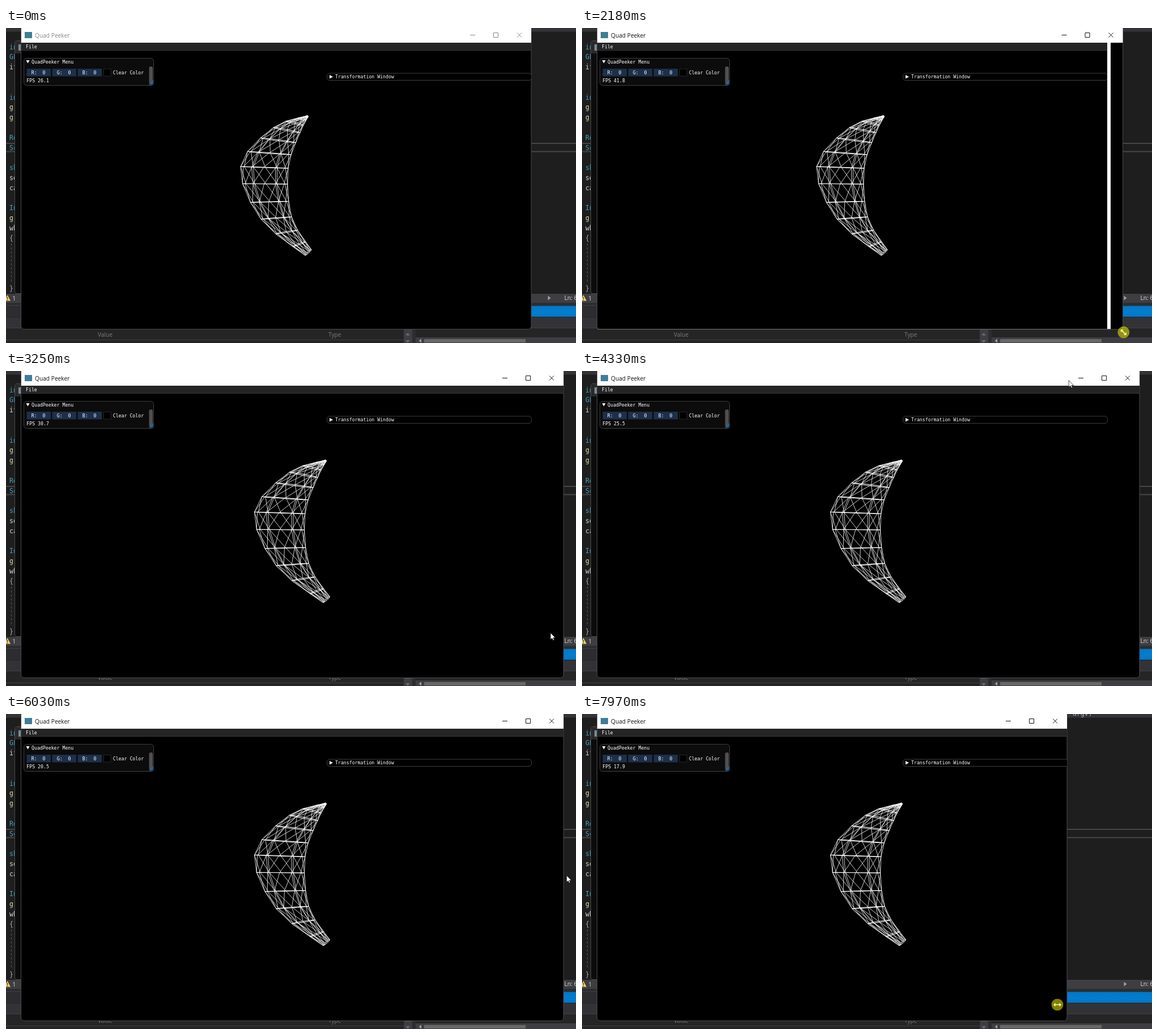
Animation, 1006 px wide and 557 px high, one loop 8000 ms. Source, as an HTML page:

```html
<!DOCTYPE html>
<html lang="en">
<head>
<meta charset="utf-8">
<title>Wireframe window resize</title>
<style>
html, body { margin: 0; width: 100%; height: 100%; overflow: hidden; background: #1e1e1e; }
svg { display: block; width: 100%; height: 100%; }
text { white-space: pre; }
.ui { font: 10.2px "Open Sans", "Noto Sans", sans-serif; }
.code { font: 11.5px "DejaVu Sans Mono", monospace; }
.gui { font: 8.22px "DejaVu Sans Mono", monospace; fill: #fff; }
.wire { fill: none; stroke: #fff; vector-effect: non-scaling-stroke; }
</style>
</head>
<body>
<svg viewBox="0 0 1006 557" xmlns="http://www.w3.org/2000/svg">
  <defs>
    <clipPath id="view"><rect id="viewRect" x="27" y="26" width="900" height="506"/></clipPath>
    <pattern id="grip" width="4" height="4" patternUnits="userSpaceOnUse">
      <path d="M0 .5h1M2 2.5h1" stroke="#2f93d8"/>
    </pattern>
  </defs>

  <!-- code editor behind -->
  <rect width="1006" height="557" fill="#1e1e1e"/>
  <rect width="1006" height="6.5" fill="#333338"/>
  <text class="code" x="866" y="2.5" fill="#b4b4b4">argv)</text>
  <path d="M0 204H1006M0 218.5H1006" stroke="#464646" stroke-width="2"/>
  <g id="code" class="code"></g>
  <path d="M9.5 381V450" stroke="#5a5a5a" stroke-dasharray="4 3"/>
  <path d="M27.5 22.5H20Q15.5 22.5 15.5 27V465Q15.5 469.5 20 469.5H27.5Z" fill="#0c0c0c" stroke="#4a4a4a"/>
  <path d="M27 23H20Q16 23 16 27V45H27Z" fill="#2a2a2b"/>
  <rect x="22" y="29" width="10" height="11" fill="#7d8896"/>

  <!-- status strip and lower panels -->
  <rect y="470" width="1006" height="16" fill="#3e3e42"/>
  <path d="M2.5 472L8 482.5H-3Z" fill="#f0cf6a"/>
  <path d="M2.5 475.5V479M2.5 480V481.5" stroke="#222" stroke-width="1.2"/>
  <text class="ui" x="11.5" y="481.5" fill="#d4d4d4">1</text>
  <path d="M956.5 473.5L961.5 477.5L956.5 481.5Z" fill="#a0a0a0"/>
  <text class="ui" x="985.5" y="481.3" fill="#e0e0e0">Ln: 63</text>
  <rect y="486" width="1006" height="71" fill="#2d2d30"/>
  <path d="M0 490.5H717" stroke="#3f3f46"/>
  <rect x="723" y="491.5" width="283" height="19" fill="#007acc"/>
  <rect x="723" y="497" width="283" height="8" fill="url(#grip)" opacity=".6"/>
  <rect y="511" width="1006" height="46" fill="#252526"/>
  <rect y="512" width="1006" height="18" fill="#333337"/>
  <path d="M0 530.5H1006M0 551.5H702" stroke="#3f3f46"/>
  <g class="ui" fill="#7c7c7c">
    <text x="162" y="546">Value</text>
    <text x="569" y="546">Type</text>
  </g>
  <rect x="702" y="531" width="15" height="26" fill="#3e3e42"/>
  <path d="M705 543.5L709 539L713 543.5ZM705 552L709 556.5L713 552Z" fill="#6c6c6c"/>
  <rect x="717" y="511" width="6" height="46" fill="#2d2d30"/>
  <rect x="723" y="547" width="283" height="10" fill="#3e3e42"/>
  <path d="M733 549.5L728.5 553L733 556.5Z" fill="#a0a0a0"/>
  <rect x="738" y="550" width="179" height="6" fill="#686868"/>

  <!-- application window -->
  <rect id="frame" x="26.5" y="-12" rx="5.5" fill="#000" stroke="#4b4b4b"/>
  <path id="stale" fill="#fff"/>
  <rect id="titleBar" x="27" width="900" height="26" fill="#fff"/>
  <rect x="33" y="7" width="13" height="11" fill="#3d7f96"/>
  <text id="title" class="ui" x="51" y="16.8">Quad Peeker</text>
  <g id="caption" fill="none">
    <rect id="hover" x="-41" width="41" height="25.5" fill="#c42b1c"/>
    <path id="sizeIcons" d="M-108 12.5H-99M-66.5 8.5H-58.5V16.5H-66.5Z"/>
    <path id="closeIcon" d="M-25 8.5L-17 16.5M-17 8.5L-25 16.5"/>
  </g>

  <g clip-path="url(#view)">
    <rect x="27" y="26" width="980" height="13" fill="#242424"/>
    <path d="M27 39.5H1006" stroke="#37373f"/>
    <g id="mesh">
      <path id="rings" class="wire" stroke-width="1"/>
      <path id="edges" class="wire" stroke-width=".8"/>
    </g>
    <rect x="31.5" y="53.5" width="229" height="48" rx="5" fill="#0c0c0c" stroke="#3e3e46"/>
    <path d="M35.5 57H41.5L38.5 62.5Z" fill="#fff"/>
    <g id="fields" fill="#1d2f4b"></g>
    <rect x="172.5" y="72.5" width="12.5" height="12.5" fill="#000" stroke="#25252b"/>
    <path d="M251 101.5H257Q260.5 101.5 260.5 98V91Z" fill="#1c4066"/>
    <rect x="252.5" y="68" width="6.5" height="31" rx="3" fill="#4f4f4f"/>
    <path d="M253 99L259 93V96Q259 99 256 99Z" fill="#31688f"/>
    <rect x="566.5" y="80" width="361" height="12.5" rx="4.5" fill="#000" stroke="#3e3e46"/>
    <path d="M571 83L577 86.2L571 89.5Z" fill="#fff"/>
    <g class="gui">
      <text x="35" y="36">File</text>
      <text x="45" y="62.6">QuadPeeker Menu</text>
      <text x="188.7" y="81.7">Clear Color</text>
      <text id="fps" x="36.3" y="95.8"></text>
      <text x="581" y="89.4">Transformation Window</text>
    </g>
  </g>

  <g id="cursor">
    <circle id="press" r="10.5" fill="#ff0" fill-opacity=".5"/>
    <path id="arrow" d="M0 0V12L2.8 9.4L4.7 13.4L6.6 12.5L4.8 8.7H8.6Z" fill="#fff" stroke="#000" stroke-width=".7"/>
    <path id="resizer" d="M-7 0L-3.5 -3.5V-.8H3.5V-3.5L7 0L3.5 3.5V.8H-3.5V3.5Z" stroke="#000" stroke-width=".6"/>
  </g>
</svg>
<script>
const LOOP = 8000, FPS_STEP = 65;
const LEFT = 27, TOP = 26;
// The first drag grows the window, the second one narrows it.
const GROW = 1760, RELAYOUT = 2760, SHRINK = 7720, SHRUNK = 7970;

const $ = id => document.getElementById(id);
const set = (id, attrs) => {
  for (const k in attrs) $(id).setAttribute(k, attrs[k]);
};
const show = (id, on) => set(id, { display: on ? 'inline' : 'none' });
const ramp = (t, from, to) => Math.min(1, Math.max(0, (t - from) / (to - from)));
const mix = (a, b, u) => a + (b - a) * u;

// Pointer stops: time, x, y.
const STOPS = [[270, 942, 520], [1340, 923, 532], [GROW, 928, 533], [2500, 977, 542], [RELAYOUT, 981, 545],
  [3250, 961, 463], [3570, 936, 100], [4400, 852, 9], [5070, 980, 5], [6100, 990, 306],
  [7210, 983, 546], [SHRINK, 984, 515], [SHRUNK, 839, 514]];

function pointer(t) {
  const n = Math.max(1, STOPS.findIndex(s => s[0] > t));
  const last = t >= SHRUNK ? STOPS.length - 1 : n;
  const a = STOPS[last - 1], b = STOPS[last], u = ramp(t, a[0], b[0]);
  return [mix(a[1], b[1], u), mix(a[2], b[2], u)];
}

function windowSize(t) {
  const grow = ramp(t, GROW, 2630);
  return [927 + 57 * grow - 128 * ramp(t, SHRINK, SHRUNK), 532 + 10 * grow ** 5];
}

// Rises, stalls during each drag, then decays.
function frameRate(t) {
  if (t < RELAYOUT) {
    return 26.1 + 20.8 * Math.sin(ramp(t, 0, 1300) * Math.PI / 2) - 5.1 * ramp(t, 1340, GROW);
  }
  return 15.4 + 15.3 * Math.exp((3250 - Math.min(t, 7760)) / 2506);
}

function buildCode() {
  const rows = 'in|GL|if|||in|g|g||Re|Sc||sh|se|ca||In|g|wh|{|||||}'.split('|');
  const color = s => s === 'g' ? '#dcdcaa' : /[{}]/.test(s) ? '#a8a8a8'
    : /if|se|ca|wh/.test(s) ? '#cfd8dc' : '#439fc0';
  $('code').innerHTML = rows.map((s, i) =>
    `<text x="6" y="${37.5 + i * 17.8}" fill="${color(s)}">${s}</text>`).join('');
}

function buildFields() {
  $('fields').innerHTML = ['R', 'G', 'B'].map((name, i) => {
    const x = 36.5 + i * 45;
    return `<rect x="${x}" y="72" width="42.5" height="13.5"/>
      <text class="gui" x="${x + 8.3}" y="81.7">${name}:  0</text>`;
  }).join('');
}

function spline(p, u) {
  const i = Math.min(Math.floor(u), p.length - 2), f = u - i;
  const at = k => p[Math.min(p.length - 1, Math.max(0, k))];
  return p[i].map((b, k) => {
    const a = at(i - 1)[k], c = at(i + 1)[k], d = at(i + 2)[k];
    return b + f / 2 * (c - a + f * (2 * a - 5 * b + 4 * c - d + f * (3 * (b - c) + d - a)));
  });
}

function buildMesh() {
  // Outer and inner end of a few cross-sections, tip to stem.
  const keys = [[531, 155.5, 533.5, 156.5], [472, 176, 519, 185], [414, 245, 498, 248],
    [450, 338, 504, 334], [528, 402, 539, 392]];
  const perKey = 3, sides = 12, count = (keys.length - 1) * perKey;
  const point = (i, j) => {
    const [ox, oy, ix, iy] = spline(keys, i / perKey);
    const a = j * 2 * Math.PI / sides, u = (1 - Math.cos(a)) / 2, depth = Math.sin(a);
    const x = mix(ox, ix, u) + depth * (ix - ox) * .02;
    const y = mix(oy, iy, u) + depth * (oy - 279) * .01;
    return x.toFixed(1) + ' ' + y.toFixed(1);
  };
  let rings = '', edges = '';
  for (let i = 0; i <= count; i++) {
    for (let j = 0; j < sides; j++) {
      const p = point(i, j);
      rings += `M${p}L${point(i, j + 1)}`;
      if (i === count) continue;
      edges += `M${p}L${point(i + 1, j + 1)}`;
      if (j % 2 === 0) edges += `M${p}L${point(i + 1, j)}`;
    }
  }
  set('rings', { d: rings });
  set('edges', { d: edges });
}

function drawWindow(t) {
  const [right, bottom] = windowSize(t);
  const active = t >= GROW, laidOut = t >= RELAYOUT;
  const viewRight = laidOut ? right : 927, viewBottom = laidOut ? 542 : 532;
  set('frame', { width: right - LEFT + .5, height: bottom + 12.5 });
  set('titleBar', { width: right - LEFT });
  set('viewRect', { width: viewRight - LEFT, height: viewBottom - TOP });

  // Unpainted strip left beside the old view while the window grows.
  show('stale', !laidOut && right > 927);
  set('stale', { d: `M927 26H${Math.min(933, right)}V${bottom}H27V532H927Z` });

  const sx = laidOut ? 957 / 900 : 1, sy = laidOut ? 516 / 506 : 1;
  set('mesh', { transform: `matrix(${sx} 0 0 ${sy} ${LEFT * (1 - sx)} ${TOP * (1 - sy)})` });

  const [px, py] = pointer(t);
  const hot = py < TOP && px > right - 41 && px < right;
  const ink = active ? '#111' : '#868686';
  set('title', { fill: ink });
  set('caption', { transform: `translate(${right} 0)` });
  set('sizeIcons', { stroke: ink });
  set('closeIcon', { stroke: hot ? '#fff' : ink });
  show('hover', hot);
}

function drawPointer(t) {
  const [x, y] = pointer(t);
  const sideways = t >= 7450;
  const diagonal = (t >= 1450 && t < 2850) || (t >= 6900 && !sideways);
  const pressed = (t >= GROW && t < RELAYOUT) || t >= SHRINK;
  show('cursor', t >= STOPS[0][0]);
  set('cursor', { transform: `translate(${x} ${y})` });
  show('press', pressed);
  show('arrow', !diagonal && !sideways);
  show('resizer', diagonal || sideways);
  set('resizer', {
    transform: `rotate(${diagonal ? 45 : 0})`,
    fill: pressed ? '#ffffb0' : '#fff',
    stroke: pressed ? 'none' : '#000'
  });
}

function draw(time) {
  const t = time % LOOP;
  drawWindow(t);
  drawPointer(t);
  $('fps').textContent = 'FPS ' + frameRate(Math.floor(t / FPS_STEP) * FPS_STEP).toFixed(1);
}

buildCode();
buildFields();
buildMesh();
draw(0);
let start;
requestAnimationFrame(function tick(now) {
  start ??= now;
  draw(now - start);
  requestAnimationFrame(tick);
});
</script>
</body>
</html>
```
